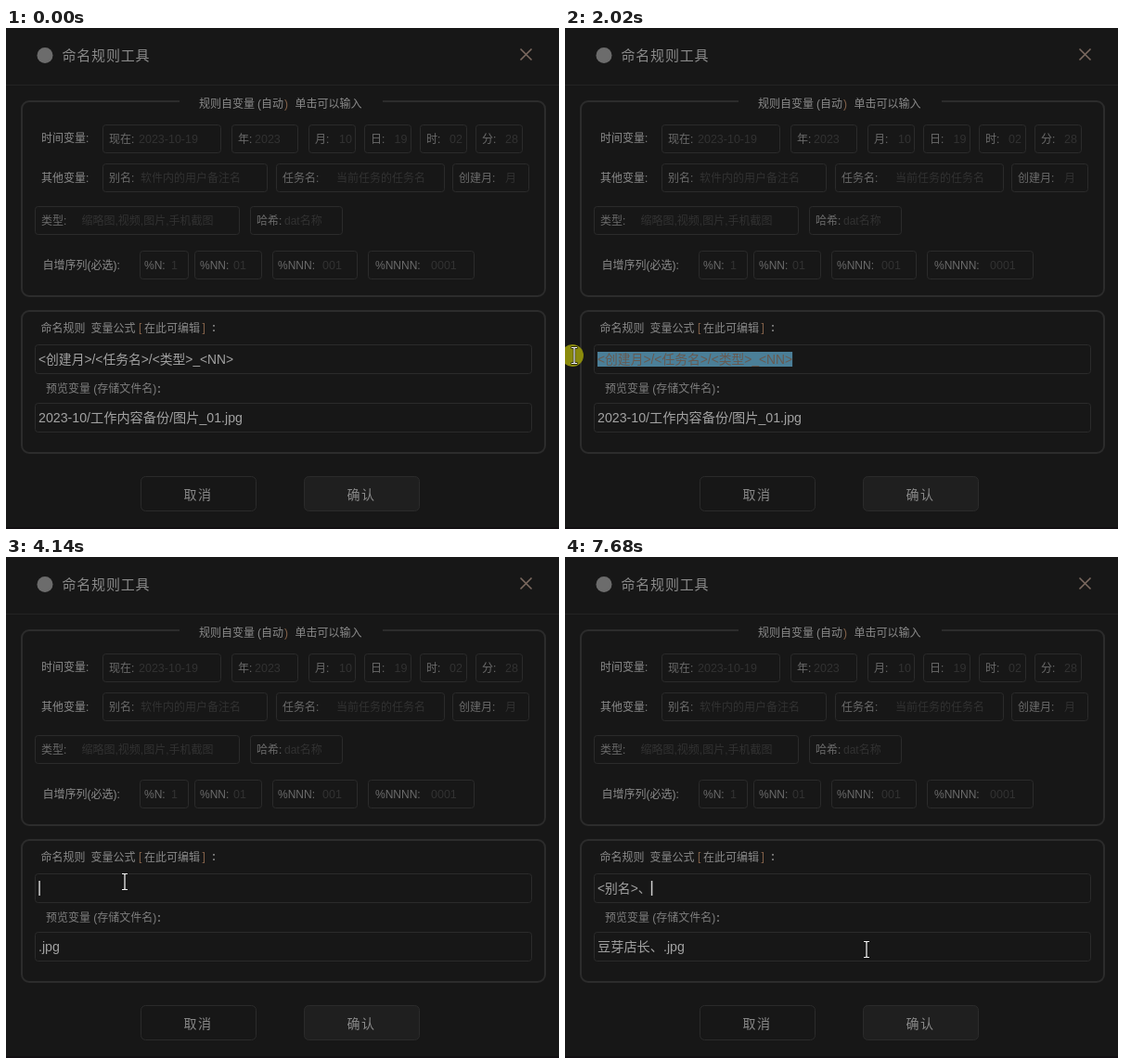
Recreate the animation shown at these times as an HTML page. Size 596 by 540 pixels, loop 8 s.

```html
<!DOCTYPE html>
<html lang="zh-CN">
<head>
<meta charset="utf-8">
<title>命名规则工具</title>
<style>
html, body { margin: 0; width: 100%; height: 100%; overflow: hidden; background: #171717; }
svg { display: block; width: 596px; height: 540px; }
text { font: 12px "Liberation Sans", "Noto Sans CJK SC", "Noto Sans CJK", sans-serif; fill: #8a8a8a; white-space: pre; }
.frame { fill: none; stroke: #2c2c2c; stroke-width: 2; }
.box { fill: none; stroke: #2b2b2b; }
.chip { fill: #6b6b6b; }
.value { fill: #323232; }
.digits { font-size: 12.5px; }
.title { font-size: 15px; letter-spacing: .8px; }
.button { font-size: 14px; letter-spacing: 1.5px; }
.accent { fill: #86634a; }
.caption { fill: #7e7e7e; }
.colon { font-weight: bold; }
.field { font-size: 14px; fill: #a2a2a2; }
#formula { font-size: 13.8px; }
#preview { font-size: 14.2px; }
#picked { fill: #685a50; }
</style>
</head>
<body>
<svg viewBox="0 0 596 540">
  <rect width="596" height="540" fill="#171717"/>
  <rect y="538" width="596" height="2" fill="#120f12"/>
  <path d="M0 61.5H596" stroke="#232323"/>
  <circle cx="42" cy="29.5" r="8.5" fill="#6c6c6c"/>
  <path d="M554.5 22.5l12 12m0-12l-12 12" stroke="#7c6a60" stroke-width="1.6"/>
  <path class="frame" d="M187 79H25a8 8 0 0 0-8 8V281a8 8 0 0 0 8 8H573a8 8 0 0 0 8-8V87a8 8 0 0 0-8-8H406"/>
  <rect class="frame" x="17" y="305" width="564" height="153" rx="8"/>
  <g id="form"></g>
  <rect id="selection" y="349" height="16" fill="#4b7f98"/>
  <text id="formula" class="field" x="35" y="362"><tspan id="plain"></tspan><tspan id="picked"></tspan></text>
  <text id="preview" class="field" x="35" y="425"></text>
  <rect id="caret" y="349" width="1.5" height="16" fill="#d0d0d0"/>
  <circle id="press" r="12" fill="#8a8a0c"/>
  <g id="arrow"><path d="M.7 0V16.2L4.4 12.7 7.2 19.2 9.7 18.1 6.9 11.8H12.1Z" fill="#fff" stroke="#111" stroke-width=".5"/></g>
  <g id="beam" fill="none">
    <path d="M-1.5-8.5H5.5M2-8.5V8.5M-1.5 8.5H5.5" stroke="#111" stroke-width="2.4"/>
    <path d="M-1-8.5H1.2L2-8 2.8-8.5H5M2-8V8M-1 8.5H1.2L2 8 2.8 8.5H5" stroke="#fff" stroke-width="1.2"/>
  </g>
  <g id="hand">
    <path d="M-1.5 2.5Q-1.5 1 0 1T1.5 2.5V8Q4 7 4.5 9 7 8 7.5 10 10 9.3 10 12V16Q9.8 18 8.5 20V23H-.5V21Q-2 19-4.6 14.5-5.5 12-3.6 11.6-2.4 12-1.5 14Z" fill="#fff" stroke="#111" stroke-width=".7"/>
    <path d="M1.5 8V11.5M4.5 9V12M7.5 10V12.5" stroke="#444" stroke-width=".7"/>
  </g>
</svg>
<script>
const NS = 'http://www.w3.org/2000/svg';
const LOOP = 8000;
const $ = id => document.getElementById(id);
const form = $('form');

function add(tag, attrs, content = '') {
  const el = document.createElementNS(NS, tag);
  for (const key in attrs) el.setAttribute(key, attrs[key]);
  el.textContent = content;
  form.append(el);
}
const label = (x, y, content, cls = '') => add('text', { x, y, class: cls }, content);
const box = (x, y, width, height, rx = 3, style = '') =>
  add('rect', { class: 'box', x: x + .5, y: y + .5, width: width - 1, height: height - 1, rx, style });

// Each chip: left, right, label, label x, value, value x.
const rows = [
  { y: 104, chips: [
    [104, 232, '现在:', 111, '2023-10-19', 143], [243, 315, '年:', 250, '2023', 268],
    [326, 377, '月:', 333, '10', 359], [386, 437, '日:', 393, '19', 418.5],
    [446, 497, '时:', 453, '02', 478], [506, 557, '分:', 513, '28', 538]] },
  { y: 146, chips: [
    [104, 282, '别名:', 111, '软件内的用户备注名', 145], [291, 473, '任务名:', 298, '当前任务的任务名', 356],
    [481, 564, '创建月:', 488, '月', 538]] },
  { y: 192, chips: [
    [31, 252, '类型:', 38, '缩略图,视频,图片,手机截图', 81.5], [263, 363, '哈希:', 270, 'dat名称', 300]] },
  { y: 240, chips: [
    [144, 197, '%N:', 149, '1', 178], [203, 276, '%NN:', 209, '01', 245],
    [287, 379, '%NNN:', 293, '001', 341], [390, 505, '%NNNN:', 398, '0001', 458]] }
];
for (const { y, chips } of rows) {
  for (const [left, right, name, nameX, value, valueX] of chips) {
    box(left, y, right - left, 31);
    label(nameX, y + 20, name, 'chip');
    label(valueX, y + 20, value, /^\d/.test(value) ? 'value digits' : 'value');
  }
}

label(60.5, 34.5, '命名规则工具', 'title');
label(208, 85.5, '规则自变量');
label(271, 85.5, '(自动');
label(300, 85.5, ')', 'accent');
label(311.5, 85.5, '单击可以输入');
label(38, 122.5, '时间变量:');
label(38, 165.5, '其他变量:');
label(39.5, 259.5, '自增序列(必选):');
label(37.5, 327.5, '命名规则');
label(91.5, 327.5, '变量公式');
label(143, 327, '[', 'accent');
label(149, 327.5, '在此可编辑');
label(211.5, 327, ']', 'accent');
label(222, 327, ':', 'colon');
label(43, 392.5, '预览变量 (存储文件名)', 'caption');
label(163, 392.5, ':', 'caption colon');

const inputs = [341, 404];
for (const y of inputs) box(31, y, 536, 32);
box(145, 483, 125, 38, 5);
box(321, 483, 125, 38, 5, 'fill:#1f1f1f');
label(191.5, 507.5, '取消', 'button');
label(367.5, 507.5, '确认', 'button');

// Pointer moves: start, end, positions, then start, control and end point.
const moves = [
  [200, 700, 6, 419, 368, 200, 35, 152, 115],
  [900, 1620, 8, 167, 141, 235, 210, 256, 355],
  [1720, 2020, 4, 255, 357, 120, 355, 8, 353],
  [2320, 3040, 8, 14, 355, 70, 368, 122, 379],
  [3140, 3340, 3, 122, 370, 123, 356, 124, 348],
  [3440, 3940, 6, 122, 347, 123, 352, 124, 364],
  [4040, 4760, 8, 126, 350, 245, 50, 157, 165],
  [5160, 5160, 1, 158, 166, 158, 166, 158, 166],
  [5960, 5960, 1, 159, 165, 159, 165, 159, 165],
  [6160, 6480, 4, 151, 168, 190, 145, 231, 141],
  [6580, 6880, 4, 258, 190, 305, 350, 323, 423]
];
const presses = [[1720, 2320], [3240, 3540], [4860, 4960]];
const DRAG = 1720;
const texts = [
  [0, '<创建月>/<任务名>/<类型>_<NN>', '2023-10/工作内容备份/图片_01.jpg'],
  [2620, '', '.jpg'],
  [4860, '<别名>', '豆芽店长.jpg'],
  [7680, '<别名>、', '豆芽店长、.jpg']
];
const latest = (list, t) => list.filter(item => item[0] <= t).pop();

function pointer(t) {
  const move = latest(moves, t);
  if (!move) return null;
  const [start, end, count, x0, y0, cx, cy, x1, y1] = move;
  const last = count - 1;
  const step = last ? Math.min(last, Math.floor((t - start) / (end - start) * last + 1e-6)) : 0;
  const u = last ? step / last : 0;
  const curve = (a, b, c) => Math.round((1 - u) ** 2 * a + 2 * u * (1 - u) * b + u * u * c);
  return { x: curve(x0, cx, x1), y: curve(y0, cy, y1) };
}

function shapeAt({ x, y }, dragging) {
  if (dragging || x > 31 && x < 567 && inputs.some(top => y >= top && y <= top + 32)) return 'beam';
  const row = rows.find(r => y >= r.y && y < r.y + 31);
  return row && row.chips.some(c => x >= c[0] && x < c[1]) ? 'hand' : 'arrow';
}

const show = (id, on) => $(id).setAttribute('visibility', on ? 'visible' : 'hidden');
const place = (id, p) => $(id).setAttribute('transform', `translate(${p.x} ${p.y})`);
const formula = $('formula');
const width = n => n ? formula.getSubStringLength(0, n) : 0;

function splitIndex(text, x) {
  let best = 0;
  for (let i = 1; i <= text.length; i++) {
    if (Math.abs(35 + width(i) - x) < Math.abs(35 + width(best) - x)) best = i;
  }
  return best;
}

function draw(t) {
  const [since, text, result] = latest(texts, t);
  const pos = pointer(t);
  const pressed = presses.some(([a, b]) => t >= a && t < b);
  const dragging = pressed && t < 2320;

  $('plain').textContent = text;
  $('picked').textContent = '';
  $('preview').textContent = result;
  const full = width(text.length);
  const selecting = t >= DRAG && since === 0;
  if (selecting) {
    const cut = splitIndex(text, dragging ? pos.x : 0);
    const from = width(cut);
    $('selection').setAttribute('x', 35 + from);
    $('selection').setAttribute('width', full - from);
    $('plain').textContent = text.slice(0, cut);
    $('picked').textContent = text.slice(cut);
  }
  show('selection', selecting);
  $('caret').setAttribute('x', 35.3 + full);
  show('caret', since > 0);

  const shape = pos && shapeAt(pos, dragging);
  for (const id of ['arrow', 'beam', 'hand']) {
    show(id, id === shape);
    if (id === shape) place(id, pos);
  }
  show('press', pressed);
  if (pressed) place('press', pos);
}

const begin = performance.now();
function tick() {
  draw((performance.now() - begin) % LOOP);
  requestAnimationFrame(tick);
}
tick();
</script>
</body>
</html>
```
